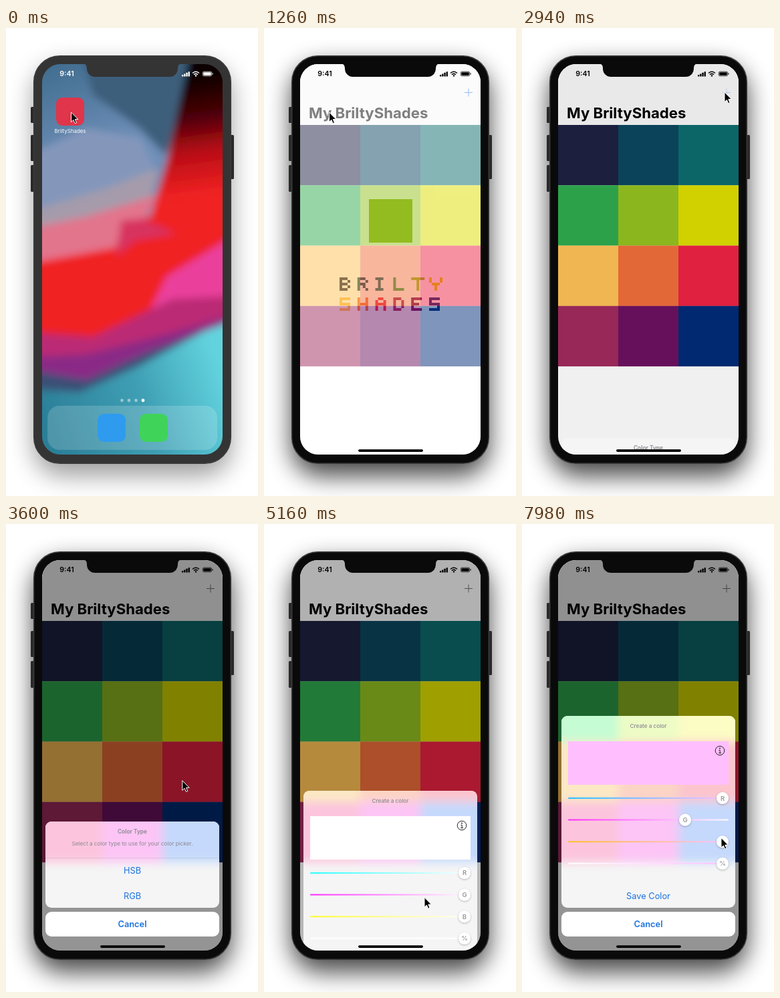
An HTML page for the animation above (8 s loop, 377x700 px).

```html
<!DOCTYPE html>
<html lang="en">
<head>
<meta charset="utf-8">
<title>Color sheet demo</title>
<style>
  html, body { margin: 0; width: 100%; height: 100%; overflow: hidden; background: #fff; }
  svg { display: block; width: 377px; height: 700px; font-family: Inter, Roboto, sans-serif; }
</style>
</head>
<body>
<svg id="stage" viewBox="0 0 377 700"></svg>
<script>
const LOOP = 8000;
const APP = "BriltyShades";
const BLUE = "#1b72e0";
const PALETTE = [
  [30, 33, 66], [11, 71, 96], [13, 108, 110],
  [48, 171, 79], [148, 193, 32], [222, 222, 0],
  [255, 193, 86], [241, 110, 59], [238, 35, 67],
  [160, 43, 93], [108, 17, 97], [0, 44, 120]
];
// Pixel lettering: square-capped strokes on a unit grid
const GLYPHS = {
  A: "M0 4V1M3 4V1M1 0H2M0 2H3",
  B: "M0 0V4H2M0 0H2M0 2H2M3 1h0M3 3h0",
  D: "M0 0V4H2M0 0H2M3 1V3",
  E: "M3 0H0V4H3M0 2H2",
  H: "M0 0V4M3 0V4M0 2H3",
  I: "M0 0H2M1 0V4M0 4H2",
  L: "M0 0V4H3",
  R: "M0 4V0H2M0 2H2M3 1h0M2 3h0M3 4h0",
  S: "M3 0H0V2H3V4H0",
  T: "M0 0H4M2 0V4",
  Y: "M0 0V1M4 0V1M1 2H3M2 2V4"
};

const rgb = c => `rgb(${c.map(Math.round)})`;
const clamp = v => Math.max(0, Math.min(1, v));
const lerp = (a, b, p) => a + (b - a) * p;
const ease = (t, start, end) => {
  const p = clamp((t - start) / (end - start));
  return p * p * (3 - 2 * p);
};

const rect = (x, y, w, h, fill, extra = "") =>
  `<rect x="${x}" y="${y}" width="${w}" height="${h}" fill="${fill}" ${extra}/>`;
const label = (x, y, size, str, fill, extra = 'text-anchor="middle"') =>
  `<text x="${x}" y="${y}" font-size="${size}" fill="${fill}" ${extra}>${str}</text>`;
const centered = (weight = 400) => `text-anchor="middle" font-weight="${weight}"`;
const blob = (points, fill) => `<polygon points="${points}" fill="${fill}"/>`;

const cells = PALETTE.map((c, i) =>
  rect(54 + i % 3 * 90, 145 + Math.floor(i / 3) * 90.25, 90.3, 90.4, rgb(c))).join("");

// Frosted glass turns each cell into a bright pastel
const pastel = c => {
  const lo = Math.min(...c), hi = Math.max(...c);
  return rgb(c.map(v => 197 + 55 * (v - lo) / (hi - lo)));
};
const frosted = rect(54, 54, 270, 584, "#f5f5f5") + `<g filter="url(#frost)">` +
  PALETTE.map((c, i) => {
    const col = i % 3;
    return rect([24, 144, 234][col], 145 + Math.floor(i / 3) * 90.25, col === 1 ? 90 : 120, 90.4, pastel(c));
  }).join("") + "</g>";

const pixelWord = (word, y, offset) => [...word].map((ch, i) =>
  `<path d="${GLYPHS[ch]}" transform="translate(${115 + i * 26.8} ${y}) scale(4)" stroke="${rgb(PALETTE[i + offset])}"/>`).join("");

const wallpaper = `<g filter="url(#soft)">` +
  rect(34, 34, 310, 624, "url(#sky)") +
  blob("110,34 290,34 275,110 238,190 200,150 130,100", "#3c5f7c") +
  blob("34,190 120,150 200,165 225,215 150,245 34,275", "#8497bb") +
  blob("34,275 150,240 228,210 215,262 100,290 34,305", "#a59bab") +
  blob("34,300 120,282 225,250 190,325 34,355", "#e2758c") +
  blob("276,34 350,34 350,660 34,660 34,352 165,328 175,292 216,282 240,200", "url(#ember)") +
  blob("165,342 172,288 205,285 255,308 195,318", "#d8305f") +
  blob("240,372 350,305 350,440 190,475", "#ea419c") +
  blob("34,455 130,462 250,405 350,400 350,460 180,500 34,530", "#bb2a74") +
  blob("34,492 120,488 240,458 350,425 350,470 140,540 34,540", "#8a2c86") +
  blob("34,512 120,527 205,488 350,434 350,660 34,660", "url(#sea)") +
  blob("34,512 120,527 205,488 300,452 200,505 110,545 34,540", "#3a4f76") +
  "</g>";

const dots = [173.5, 184, 194.5, 205].map((x, i) =>
  `<circle cx="${x}" cy="557" r="2.4" fill="#fff" opacity="${i === 3 ? 1 : .45}"/>`).join("");

const home = wallpaper +
  rect(75, 104, 42, 42, "#e0354a", 'rx="9.5"') +
  label(96, 157, 7.9, APP, "#fff") + dots +
  rect(62, 565, 254, 66, "#fff", 'rx="18" opacity=".17"') +
  rect(137, 577, 42, 42, "#2f9bef", 'rx="9.5"') +
  rect(200, 577, 42, 42, "#3fd35a", 'rx="9.5"');

const list = rect(54, 54, 270, 584, "#fff") + rect(54, 54, 270, 91, "#f7f7f7") +
  label(67, 134.5, 22.2, "My " + APP, "#000", 'font-weight="700"') + cells +
  `<path id="plus" d="M300 96.5h12M306 90.5v12"/>`;

const launch = rect(54, 54, 270, 584, "#fff", 'id="launchCard"') +
  rect(157, 256, 65, 65, "#92b820") +
  `<g fill="none" stroke-linecap="square">${pixelWord("BRILTY", 375, 0)}${pixelWord("SHADES", 405, 6)}</g>`;

const status = label(91, 72, 10.6, "9:41", "currentColor", centered(600)) +
  [0, 1, 2, 3].map(i => rect(263 + i * 3.2, 70 - i * 1.6, 2.3, 2.4 + i * 1.6, "currentColor", 'rx=".5"')).join("") +
  `<g fill="none" stroke="currentColor" stroke-width="1.5"><path d="M279 67.5q5-4.6 10 0M281 69.7q3-2.7 6 0"/></g>
   <circle cx="284" cy="71.4" r="1.2" fill="currentColor"/>` +
  rect(294.3, 65.2, 13.4, 6.6, "none", 'rx="2" stroke="currentColor" stroke-width=".7"') +
  rect(295.3, 66.2, 11.4, 4.6, "currentColor", 'rx="1"') + rect(308.5, 67.3, 1, 2.4, "currentColor");

const sheet = (id, top, content) => `
  <clipPath id="${id}Clip"><rect x="59" y="${top}" width="260" height="${574 - top}" rx="9"/></clipPath>
  <g id="${id}">
    <g clip-path="url(#${id}Clip)"><g id="${id}Back">${frosted}</g></g>
    ${content}
    ${rect(59, 580, 260, 37, "#fff", 'rx="9"')}
    ${label(189, 603, 12.8, "Cancel", BLUE, centered(600))}
  </g>`;

const typeSheet = sheet("types", 445,
  label(189, 463, 8.4, "Color Type", "#8b8790", centered(600)) +
  label(189, 481, 8.2, "Select a color type to use for your color picker.", "#8b8790") +
  rect(59, 499.5, 260, .7, "#000", 'opacity=".15"') +
  label(189, 523, 12.8, "HSB", BLUE) + label(189, 560.5, 12.8, "RGB", BLUE));

const CHANNELS = ["R", "G", "B", "%"];
const trackY = i => 410 + i * 32.6;
const sliders = CHANNELS.map((name, i) => `
  <linearGradient id="ramp${i}"><stop/><stop offset="1"/></linearGradient>
  ${rect(69, trackY(i) - 1, 240, 2, `url(#ramp${i})`, 'rx="1"')}
  <g id="knob${i}">
    <circle cy="${trackY(i)}" r="9" fill="#fff" filter="url(#lift)"/>
    ${label(0, trackY(i) + 3.5, 9.6, name, "#999", centered(600))}
  </g>`).join("");

const pickerSheet = sheet("picker", 287,
  label(189, 305, 8.2, "Create a color", "#8b8790", centered(500)) +
  rect(69, 325, 240, 65, "#fff", 'id="swatch"') +
  `<circle cx="296" cy="339" r="6.8" fill="none" stroke="#222"/>
   <circle cx="296" cy="335.6" r="1" fill="#222"/>
   <path d="M294.4 338.3h1.8v4.4M294.2 342.7h3.8" fill="none" stroke="#222"/>` +
  sliders + label(189, 560.5, 12.8, "Save Color", BLUE));

const stage = document.getElementById("stage");
stage.innerHTML = `
  <defs>
    <filter id="shade" x="-40%" y="-30%" width="180%" height="160%"><feGaussianBlur stdDeviation="18"/></filter>
    <filter id="soft"><feGaussianBlur stdDeviation="6"/></filter>
    <filter id="frost"><feGaussianBlur stdDeviation="7"/></filter>
    <filter id="lift" x="-50%" y="-50%" width="200%" height="200%">
      <feDropShadow dx="0" dy="1" stdDeviation="1.5" flood-opacity=".3"/>
    </filter>
    <linearGradient id="sky" gradientUnits="userSpaceOnUse" x1="54" y1="54" x2="110" y2="200">
      <stop stop-color="#3f6c8e"/><stop offset="1" stop-color="#6f8fb8"/>
    </linearGradient>
    <linearGradient id="sea" gradientUnits="userSpaceOnUse" x1="60" y1="600" x2="320" y2="510">
      <stop stop-color="#2b7f98"/><stop offset=".55" stop-color="#3f9fb4"/><stop offset="1" stop-color="#62d3de"/>
    </linearGradient>
    <linearGradient id="ember" gradientUnits="userSpaceOnUse" x1="260" y1="70" x2="285" y2="250">
      <stop stop-color="#080000"/><stop offset=".35" stop-color="#4a0007"/>
      <stop offset=".65" stop-color="#b80c16"/><stop offset="1" stop-color="#f02222"/>
    </linearGradient>
    <clipPath id="screen"><rect x="54" y="54" width="270" height="584" rx="27"/></clipPath>
  </defs>
  ${rect(41, 56, 296, 614, "#000", 'rx="44" filter="url(#shade)" id="shadow"')}
  <g id="body">
    ${[[37, 118, 24], [37, 160, 39], [37, 205, 40], [335, 160, 66]].map(([x, y, h]) =>
      rect(x, y, 6, h, "#2a2a2a", 'rx="1.5"')).join("")}
    ${rect(41.7, 41.7, 294.6, 609.6, "currentColor", 'rx="39" stroke="#3c3c3c" stroke-width="1.5"')}
  </g>
  <g clip-path="url(#screen)">
    <g id="home">${home}</g>
    <g id="list">${list}</g>
    <g id="launch">${launch}</g>
    <g id="status">${status}</g>
    ${rect(54, 54, 270, 584, "#000", 'id="dim"')}
    ${typeSheet}${pickerSheet}
    ${rect(141, 630.3, 97, 3.6, "#000", 'rx="1.8" id="homeBar"')}
  </g>
  <path id="notch" fill="currentColor" d="M115 53q6 1 6 7v1a12 12 0 0 0 12 12h112a12 12 0 0 0 12-12v-1q0-6 6-7z"/>
  <path id="cursor" d="M0 0V14.6L3.4 11.5 5.7 16.7 8 15.7 5.8 10.6H10.4Z" fill="#000" stroke="#fff" stroke-width="1"/>`;

const el = id => document.getElementById(id);
const set = (id, attrs) => {
  for (const [name, value] of Object.entries(attrs)) el(id).setAttribute(name, value);
};
const show = (id, visible) => set(id, { display: visible ? "inline" : "none" });

const CURSOR_START = [97.5, 126];
// start, end, x, y
const CURSOR_MOVES = [
  [1700, 2420, 303, 96],
  [3240, 3860, 240, 558.5],
  [5340, 6000, 298, 441],
  [6480, 7080, 242, 441],
  [7200, 7740, 298, 469.5]
];

function placeSheet(id, progress, travel) {
  const shift = travel * (1 - progress);
  show(id, progress > 0);
  set(id, { transform: `translate(0 ${shift})` });
  set(id + "Back", { transform: `translate(0 ${-shift})` });
}

function drawSliders(t) {
  const green = 1 - .252 * ease(t, 6480, 7080);
  const values = [1, green, 1, 1];
  const color = values.slice(0, 3).map(v => v * 255);
  set("swatch", { fill: rgb(color) });
  CHANNELS.forEach((_, i) => {
    const ends = [40, 255].map(v => i === 3 ? color : color.map((c, k) => k === i ? v : c));
    if (i === 3) ends[0] = [255, 255, 255];
    const stops = el("ramp" + i).children;
    ends.forEach((c, k) => stops[k].setAttribute("stop-color", rgb(c)));
    set("knob" + i, { transform: `translate(${lerp(78, 300, values[i])} 0)` });
  });
}

function draw(t) {
  const zoom = ease(t, 220, 640);
  const reveal = ease(t, 1020, 1500);
  const inApp = t >= 430;

  set("shadow", { opacity: inApp ? .72 : .38 });
  for (const id of ["body", "notch"]) set(id, { color: inApp ? "#0a0a0a" : "#343434" });
  set("status", { color: inApp ? "#000" : "#fff" });
  show("home", zoom < 1);
  show("list", t >= 900);
  show("homeBar", inApp);

  const sx = lerp(42 / 270, 1, zoom), sy = lerp(42 / 584, 1, zoom);
  const x = lerp(75, 54, zoom), y = lerp(104, 54, zoom);
  show("launch", zoom > 0 && reveal < 1);
  set("launch", {
    transform: `translate(${x} ${y}) scale(${sx} ${sy}) translate(-54 -54)`,
    opacity: clamp(zoom * 4) * (1 - reveal)
  });
  set("launchCard", { rx: 33 * (1 - zoom) });

  const types = ease(t, 2835, 3290) - ease(t, 4400, 4850);
  const picker = ease(t, 4880, 5330);
  placeSheet("types", types, 195);
  placeSheet("picker", picker, 353);
  const cover = Math.max(types, picker);
  set("dim", { opacity: .42 * cover });
  const pressed = t > 2580 && t < 2980;
  set("plus", { stroke: cover > .3 ? "#777" : "#2c7be5", opacity: pressed ? .25 : 1 });
  drawSliders(t);

  let [cx, cy] = CURSOR_START;
  for (const [start, end, toX, toY] of CURSOR_MOVES) {
    const p = ease(t, start, end);
    cx = lerp(cx, toX, p);
    cy = lerp(cy, toY, p);
  }
  set("cursor", { transform: `translate(${cx} ${cy})` });
}

function tick() {
  draw(performance.now() % LOOP);
  requestAnimationFrame(tick);
}
tick();
</script>
</body>
</html>
```
